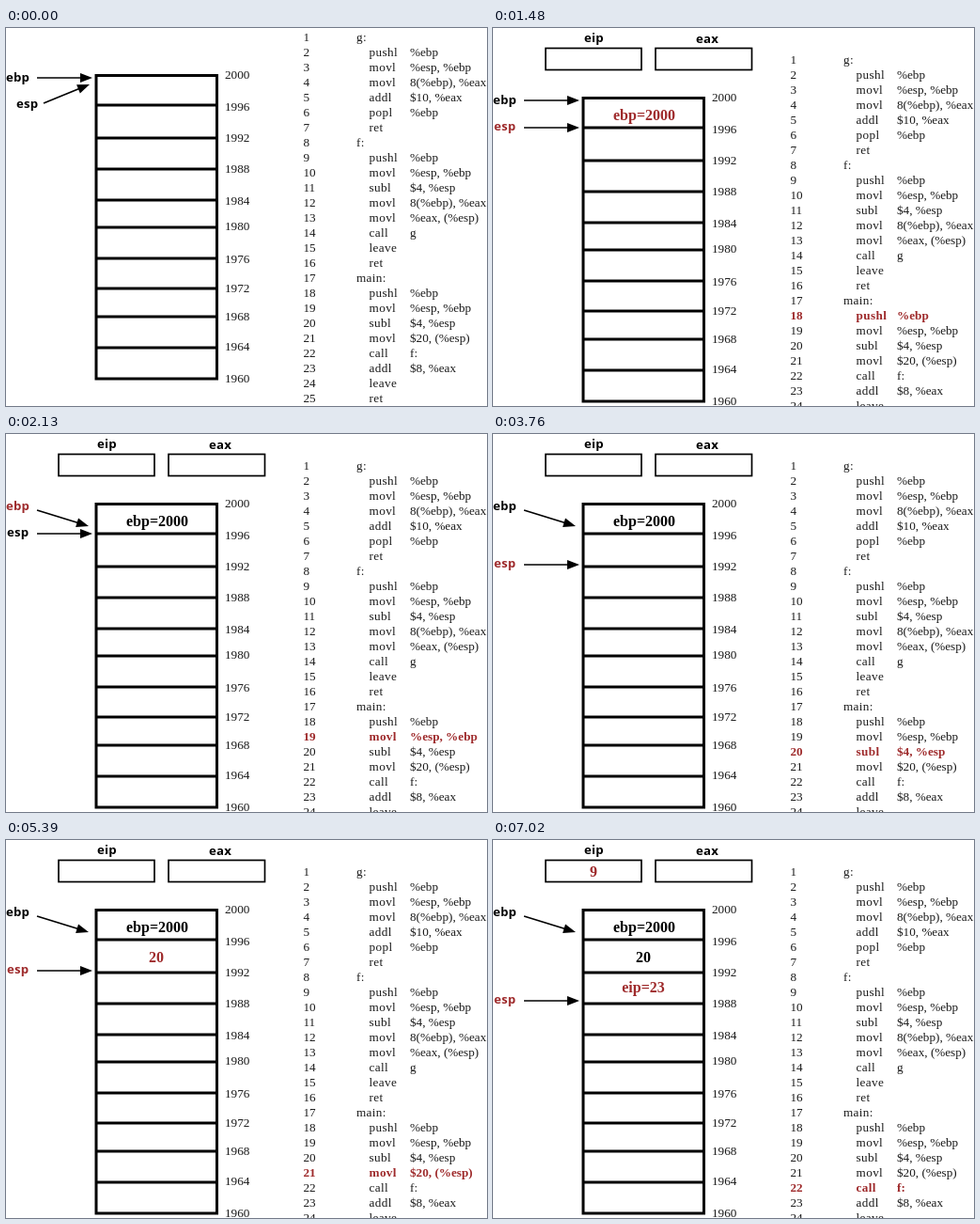
Write an HTML page that moves like this. It is 512 px wide and 402 px high and loops after 8 s.

```html
<!DOCTYPE html>
<html lang="en">
<head>
<meta charset="utf-8">
<title>Call stack walk-through</title>
<style>
  html, body { margin: 0; width: 100%; height: 100%; overflow: hidden; background: #fff; }
  #strip { width: 512px; animation: steps 8s step-end infinite; }
  svg { display: block; width: 512px; height: 402px; overflow: hidden; }
  text { fill: #1a1a1a; white-space: pre; }
  .code { font: 13.2px "Liberation Serif", "Times New Roman", serif; }
  .op { letter-spacing: .35px; }
  .cell { font: bold 16px "Liberation Serif", "Times New Roman", serif; text-anchor: middle; fill: #000; }
  .reg { font: bold 13.2px "Open Sans", "Noto Sans", sans-serif; letter-spacing: .2px; fill: #000; }
  .hot { fill: #9e2a2b; }
  .code.hot { font-weight: bold; }
  .box { fill: none; stroke: #000; }
  @keyframes steps {
    0% { transform: translateY(0); }
    6.25% { transform: translateY(-402px); }
    26.625% { transform: translateY(-804px); }
    47% { transform: translateY(-1206px); }
    67.375% { transform: translateY(-1608px); }
    87.75% { transform: translateY(-2010px); }
  }
</style>
</head>
<body>
<div id="strip"></div>
<script>
const program = `g:
pushl|%ebp
movl|%esp, %ebp
movl|8(%ebp), %eax
addl|$10, %eax
popl|%ebp
ret
f:
pushl|%ebp
movl|%esp, %ebp
subl|$4, %esp
movl|8(%ebp), %eax
movl|%eax, (%esp)
call|g
leave
ret
main:
pushl|%ebp
movl|%esp, %ebp
subl|$4, %esp
movl|$20, (%esp)
call|f:
addl|$8, %eax
leave
ret`.split("\n");

// Rules of the stack and baselines of its address labels
const rules = [50, 82, 117, 150, 183, 212, 245, 277, 307, 340, 373];
const labels = [54, 88, 121, 154, 188, 215, 250, 281, 311, 343, 377];

const text = (x, y, str, cls) => `<text x="${x}" y="${y}" class="${cls}">${str}</text>`;
const rect = (x, y, w, h, line) =>
  `<rect x="${x}" y="${y}" width="${w}" height="${h}" class="box" stroke-width="${line}"/>`;

function arrow(x1, y1, x2, y2) {
  const angle = Math.atan2(y2 - y1, x2 - x1) * 180 / Math.PI;
  const len = Math.hypot(x2 - x1, y2 - y1);
  return `<g transform="translate(${x1} ${y1}) rotate(${angle})">
    <path d="M0 0H${len - 10}" class="box" stroke-width="1.7"/>
    <path d="M${len} 0l-13 -5v10z"/></g>`;
}

function listing(top, active) {
  return program.map((line, i) => {
    const y = top + 14 + 16 * i;
    const cls = i + 1 === active ? "code hot" : "code";
    const [op, arg = ""] = line.split("|");
    const isLabel = !arg && op.endsWith(":");
    return text(316.4, y, i + 1, cls) + text(isLabel ? 373 : 386.6, y, op, cls + " op") +
      (arg && text(430, y, arg, cls));
  }).join("");
}

function stack(top) {
  const lines = rules.slice(1, -1).map(y => `M96 ${y + top}H225`).join("");
  return rect(96, 50.5 + top, 128.5, 322.5, 3) +
    `<path d="${lines}" class="box" stroke-width="2.8"/>` +
    labels.map((y, i) => text(233, y + top, 2000 - 4 * i, "code")).join("");
}

const registers = rect(56, 21.5, 102, 23, 1.7) + rect(173, 21.5, 102.5, 23, 1.7) +
  text(97, 15, "eip", "reg") + text(216, 15.5, "eax", "reg");

// Pointer: name, label x, label baseline, arrow ends, highlighted
const pointer = (name, x, y, ends, hot) =>
  text(x, y, name, hot ? "reg hot" : "reg") + arrow(...ends);
const cell = (x, y, str, hot) => text(x, y, str, hot ? "cell hot" : "cell");

const ebpFlat = pointer("ebp", 0, 80.5, [33, 77, 92, 77]);
const ebpDown = hot => pointer("ebp", 0, 80.5, [33, 81, 88, 98], hot);
const esp = (y, hot) => pointer("esp", 1, y + 2.5, [33, y, 92, y], hot);
const saved = hot => cell(161, 97.5, "ebp=2000", hot);
const arg = hot => cell(160, 130, "20", hot);

const scenes = [
  [0, 0, pointer("ebp", 0, 57, [33, 53, 92, 53]) + pointer("esp", 11, 85, [40, 80, 89, 60])],
  [24, 18, ebpFlat + esp(106, true) + saved(true)],
  [24, 19, ebpDown(true) + esp(106) + saved()],
  [24, 20, ebpDown() + esp(139, true) + saved()],
  [24, 21, ebpDown() + esp(139, true) + saved() + arg(true)],
  [24, 22, ebpDown() + esp(171, true) + saved() + arg() +
    cell(160, 162, "eip=23", true) + cell(107, 38.5, "9", true)]
];

document.getElementById("strip").innerHTML = scenes.map(([top, active, parts]) =>
  `<svg viewBox="0 0 512 402">${stack(top)}${top ? registers : ""}${listing(top, active)}${parts}</svg>`
).join("");
</script>
</body>
</html>
```
